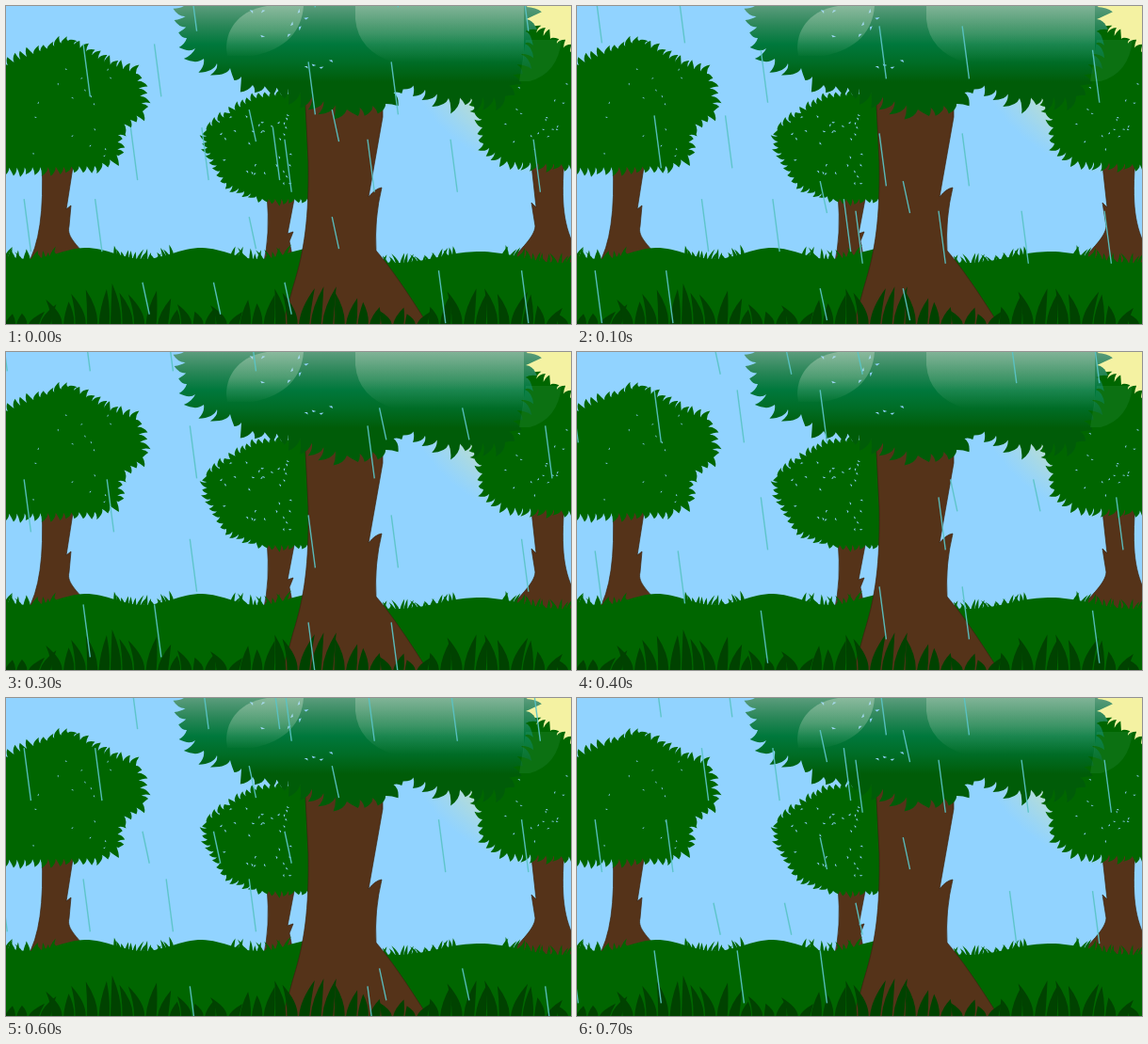
An HTML page with a canvas that plays this animation: 600 by 338 pixels, repeating every 800 ms.

```html
<!DOCTYPE html>
<html lang="en">
<head>
<meta charset="utf-8">
<title>Rain in the forest</title>
<style>
html, body { margin: 0; width: 100%; height: 100%; overflow: hidden; background: #91d3ff; }
canvas { display: block; }
</style>
</head>
<body>
<canvas id="stage" width="600" height="338"></canvas>
<script>
const W = 600, H = 338, TAU = Math.PI * 2;
const GREEN = '#006600', DARK = '#004200', BARK = '#553319', SKY = '#91d3ff';
const view = document.getElementById('stage').getContext('2d');
const scene = document.createElement('canvas');
scene.width = W;
scene.height = H;
const g = scene.getContext('2d');

let seed = 7;
const rnd = () => (seed = (seed * 16807) % 2147483647) / 2147483647;
const spread = r => (rnd() - 0.5) * 2 * r;

function fill(path, color) {
  g.fillStyle = color;
  g.fill(path);
}

function fade(height, ...colors) {
  const f = g.createLinearGradient(0, 0, 0, height);
  colors.forEach((c, i) => f.addColorStop(i / (colors.length - 1), c));
  return f;
}

// Closed clockwise outline whose edges carry curved leaf tips.
function leafy(pts, size, step, color = GREEN) {
  const p = new Path2D();
  p.moveTo(...pts[0]);
  pts.forEach(([x, y], i) => {
    const [x2, y2] = pts[(i + 1) % pts.length];
    const len = Math.hypot(x2 - x, y2 - y);
    const dx = (x2 - x) / len, dy = (y2 - y) / len;
    const n = Math.max(1, Math.round(len / step)), s = len / n;
    for (let k = 0; k < n; k++) {
      const ax = x + dx * s * k, ay = y + dy * s * k;
      const h = size * (0.6 + rnd() * 0.7), lean = s * (0.2 + rnd());
      const at = (along, out) => [ax + dx * along + dy * out, ay + dy * along - dx * out];
      p.quadraticCurveTo(...at(0, h * 0.6), ...at(lean, h));
      p.quadraticCurveTo(...at(s * 0.75, h * 0.4), ...at(s, 0));
    }
  });
  p.closePath();
  fill(p, color);
}

// Small gaps between leaves.
function specks(n, x, y, w, h, size) {
  g.fillStyle = SKY;
  for (let i = 0; i < n; i++) {
    g.save();
    g.translate(x + rnd() * w, y + rnd() * h);
    g.rotate(rnd() * TAU);
    g.beginPath();
    g.moveTo(-size, 0);
    g.lineTo(size, -size * 0.4);
    g.lineTo(0, size * 0.6);
    g.fill();
    g.restore();
  }
}

function trunk(d) {
  const p = new Path2D(d);
  fill(p, BARK);
  g.strokeStyle = '#3d2410';
  g.lineWidth = 0.7;
  g.stroke(p);
}

function blade(x, bottom, height, lean, w, color) {
  const p = new Path2D(), mid = bottom - height * 0.45;
  p.moveTo(x - w / 2, bottom);
  p.quadraticCurveTo(x - w * 0.45, mid, x + lean, bottom - height);
  p.quadraticCurveTo(x + w * 0.65, mid, x + w / 2, bottom);
  fill(p, color);
}

function sky() {
  g.fillStyle = SKY;
  g.fillRect(0, 0, W, H);
  const glow = g.createRadialGradient(590, 5, 38, 590, 5, 178);
  glow.addColorStop(0, 'rgba(246,243,160,.95)');
  glow.addColorStop(0.6, 'rgba(226,232,165,.65)');
  glow.addColorStop(1, 'rgba(200,225,190,0)');
  g.fillStyle = glow;
  g.fillRect(400, 0, 200, 190);
  const sun = new Path2D();
  sun.arc(590, 4, 42, 0, TAU);
  fill(sun, '#f4f2a2');
}

function backTrees() {
  trunk('M38 165Q42 244 22 276H94C76 254 64 246 67 234L69 212L64 216L72 165Z');
  leafy([[66, 37], [104, 60], [138, 72], [145, 112], [119, 130], [118, 160], [94, 170],
    [-5, 172], [-5, 66], [22, 54]], 8, 8);
  specks(18, 8, 64, 112, 96, 1.4);

  trunk('M277 200Q281 244 273 276H306L301 250L305 240L299 242L307 200Z');
  leafy([[266, 98], [340, 90], [340, 205], [272, 205], [234, 188], [214, 150],
    [213, 132], [238, 114]], 6, 7);
  specks(34, 222, 116, 84, 76, 1.8);

  trunk('M557 160L563 214L558 209L562 234C561 246 548 256 532 276H606V260C592 235 589 210 593 160Z');
  leafy([[549, 22], [578, 35], [606, 54], [606, 169], [532, 165], [507, 146], [505, 112],
    [495, 100], [545, 60]], 8, 8);
  specks(20, 514, 80, 82, 75, 1.6);
}

const hill = x => x < 340
  ? 263 + 6 * Math.cos((x - 146) / 122 * TAU)
  : 267 + 6 * Math.cos((x - 415) / 175 * TAU);

function ground() {
  const p = new Path2D();
  p.moveTo(0, H);
  for (let x = 0; x <= W; x += 4) {
    p.lineTo(x, hill(x));
    if (hill(x) > 263) blade(x, hill(x) + 4, 8 + rnd() * 7, spread(7), 4, GREEN);
  }
  p.lineTo(W, H);
  fill(p, GREEN);
}

function bigTree() {
  trunk('M317 85L321 165C322 225 317 260 305 298L293 342H450Q414 284 393 260' +
    'Q391 226 399 193Q392 194 385 203L400 118V85Z');
  leafy([[189, -12], [553, -12], [551, 40], [530, 96], [470, 98], [420, 80], [403, 104],
    [362, 110], [300, 88], [262, 84], [238, 66], [210, 56], [192, 34]], 13, 13,
    fade(81, '#5b9c7c', '#2b8759', '#00783c', '#006c25', '#005c08'));
  specks(8, 260, 4, 60, 44, 2.6);
  specks(4, 318, 56, 30, 10, 2.4);
}

function cloud() {
  const white = a => `rgba(205,228,205,${a})`;
  fill(new Path2D('M234 45C234 22 250 4 277 0H316C314 26 298 46 262 53H235Z'),
    fade(53, white(0.4), white(0.28), white(0.02)));
  fill(new Path2D('M371 14V0H550V60H412Q374 48 371 14Z'),
    fade(60, white(0.32), white(0.2), white(0)));
  fill(new Path2D('M552 36H590Q586 72 556 80H545Z'), 'rgba(120,205,180,.1)');
}

function frontGrass() {
  for (let x = 4; x < W; x += 12.5) {
    const tall = 28 - 13 * Math.cos((x - 15) / 200 * TAU);
    blade(x, H + 2, tall + spread(6), spread(13), 11, DARK);
  }
}

// Drops sit on a grid; each row of them: first column, gap, count, line.
const LONG = [[7, 6, 2, 3], [26, 7, 2, 4.5], [11, 6, 3, 10], [24, 7, 4, 11], [2, 6, 2, 16],
  [37, 7, 2, 22], [0, 7, 4, 27], [16, 15, 3, 36], [2, 7, 2, 40.5], [26, 7, 2, 43.5],
  [16, 28, 2, 45.5]];
const SHORT = [[21, 7, 2, 8.5], [21, 7, 2, 17.5], [12, 6, 3, 23], [32, 7, 2, 34.5]];
const STEP = 76, STEPS = 8, SPAN = STEP * STEPS, CELL = SPAN / 48;

function rain(rows, len, k) {
  view.beginPath();
  for (const [col, gap, count, line] of rows) {
    const y = (2.4 + CELL * line + STEP * k + 100) % SPAN - 100;
    for (let i = 0; i < count; i++) {
      const x = (col + gap * i) * 12.58 - 6;
      view.moveTo(x, y);
      view.lineTo(x + 7.3, y + len);
    }
  }
  view.stroke();
}

function frame(now) {
  const k = Math.floor(now / 100) % STEPS;
  view.drawImage(scene, 0, 0);
  view.strokeStyle = 'rgba(91,196,198,.92)';
  view.lineWidth = 1.4;
  rain(LONG, 56, k);
  rain(SHORT, 34, k);
}

[sky, backTrees, ground, bigTree, cloud, frontGrass].forEach(draw => draw());

let start;
function loop(now) {
  start ??= now;
  frame(now - start);
  requestAnimationFrame(loop);
}
frame(0);
requestAnimationFrame(loop);
</script>
</body>
</html>
```
